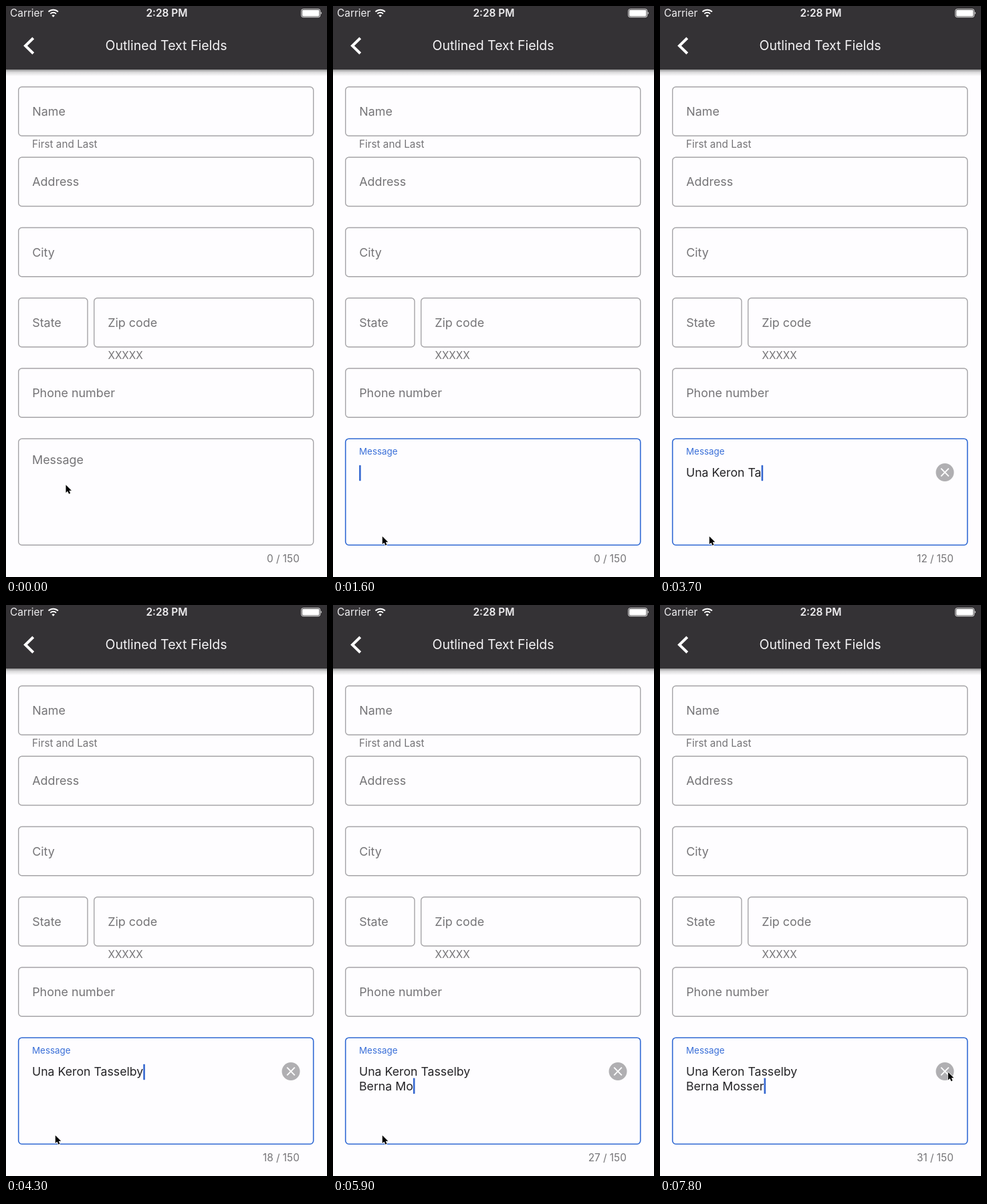
An HTML page for the animation above (8 s loop, 480 by 854 pixels).

```html
<!DOCTYPE html>
<html lang="en">
<head>
<meta charset="utf-8">
<title>Outlined Text Fields</title>
<style>
  html, body { margin: 0; width: 100%; height: 100%; overflow: hidden; background: #fefdff; }
  svg { display: block; width: 100%; height: 100%; }
  text { font: 17.9px Inter, "Liberation Sans", sans-serif; fill: #757477; white-space: pre; }
  .field { fill: none; stroke: #a5a4a7; stroke-width: 1.4; }
  .field.focus { stroke: #3069d3; stroke-width: 1.6; }
  .small { font-size: 15.3px; }
  .status { font-size: 15.4px; fill: #f0eff1; }
  .time { font-weight: 600; text-anchor: middle; }
  .title { font-size: 19.5px; fill: #f5f4f6; text-anchor: middle; }
  .count { text-anchor: end; }
  .typed { font-size: 17.7px; fill: #242326; }
  .blue { fill: #3a6fd8; }
  .line { fill: none; stroke: #fff; }
</style>
</head>
<body>
<svg viewBox="0 0 480 854">
  <defs>
    <linearGradient id="shade" x2="0" y2="1">
      <stop stop-color="#000" stop-opacity=".42"/>
      <stop offset=".4" stop-color="#000" stop-opacity=".14"/>
      <stop offset="1" stop-color="#000" stop-opacity="0"/>
    </linearGradient>
  </defs>
  <rect width="480" height="854" fill="#fefdff"/>

  <rect y="95" width="480" height="10" fill="url(#shade)"/>
  <rect width="480" height="95" fill="#343235"/>
  <text class="status" x="6" y="16.3">Carrier</text>
  <g class="line" stroke-width="2">
    <path d="M63.5 8.6a10.3 10.3 0 0 1 14.4 0M66.4 11.6a6.2 6.2 0 0 1 8.6 0"/>
    <path d="M70.7 16.8l-2.3-2.5a3.4 3.4 0 0 1 4.6 0z" fill="#fff" stroke="none"/>
  </g>
  <text class="status time" x="240.5" y="16.3">2:28 PM</text>
  <rect class="line" x="441.7" y="4.7" width="28" height="12" rx="2.6" stroke-width=".9"/>
  <rect x="443" y="6" width="25.4" height="9.4" rx="1.4" fill="#fff"/>
  <path d="M470.8 8.6q2.2 2 0 4.2z" fill="#fff"/>
  <path class="line" d="M40.8 48L29 59.5 40.8 71" stroke-width="4"/>
  <text class="title" x="239.5" y="66.2">Outlined Text Fields</text>

  <g id="form"></g>
  <text class="small" x="39" y="212.3">First and Last</text>
  <text class="small" x="152.5" y="528">XXXXX</text>

  <rect id="box" class="field" x="18.7" y="647.2" width="441" height="159" rx="5"/>
  <text id="label">Message</text>
  <rect id="mark" y="707" height="24.5" fill="#d0def5"/>
  <text id="line0" class="typed" x="39" y="704.4"></text>
  <text id="line1" class="typed" x="39" y="726.3"></text>
  <g id="chip">
    <path d="M.5 .5H59.5a13.6 13.6 0 0 1 0 27.2H.5z" fill="#fff" stroke="#bcbbbe"/>
    <text class="blue" x="2.6" y="20.6">Moss</text>
    <path d="M54 9.5l9 9m0-9l-9 9" stroke="#b3b2b5" stroke-width="1.4"/>
  </g>
  <rect id="caret" width="2.6" height="23.4" rx=".6" fill="#3567d0"/>
  <g id="clear">
    <circle cx="426" cy="697.5" r="13.5" fill="#b0afb2"/>
    <path class="line" d="M420.2 691.7l11.6 11.6m0-11.6l-11.6 11.6" stroke-width="1.9"/>
  </g>
  <text id="count" class="small count" x="438.8" y="831.8"></text>

  <circle id="ring" cx="90" cy="717.5" r="49.5" fill="none" stroke="#222" stroke-width="2.4"/>
  <path id="pointer" d="M0 0V11.8L2.7 9.3 4.6 13.4 6.7 12.5 4.9 8.4H8.5Z"
        stroke="#fff" stroke-width="1.4" paint-order="stroke" stroke-linejoin="round"/>
</svg>
<script>
const LOOP = 8000, STEP = 100;
const el = id => document.getElementById(id);
const [form, box, label, mark, chip, caret, clear, count, ring, pointer] =
  ["form", "box", "label", "mark", "chip", "caret", "clear", "count", "ring", "pointer"].map(el);
const lines = [el("line0"), el("line1")];

const fields = [
  ["Name", 18.7, 121, 441], ["Address", 18.7, 226.2, 441], ["City", 18.7, 331.5, 441],
  ["State", 18.7, 436.7, 103.3], ["Zip code", 131.7, 436.7, 328], ["Phone number", 18.7, 542, 441]
];
form.innerHTML = fields.map(([name, x, y, w]) =>
  `<rect class="field" x="${x}" y="${y}" width="${w}" height="73.3" rx="5"/>
   <text x="${x + 20.5}" y="${y + 43}">${name}</text>`).join("");

// One time per keystroke, in units of 100 ms
const text = "Una Keron Tasselby\nBerna Mosser";
const keys = [17, 19, 21, 23, 25, 27, 30, 32, 33, 34, 36, 37, 38, 39, 40, 41, 42, 43, 45,
              48, 50, 52, 53, 54, 55, 57, 59, 61, 63, 64, 67];

// Pointer stops: time, x, y
const path = [[700, 89.5, 716.3], [1100, 73.8, 793.3], [6900, 73.8, 793.3],
              [7600, 435, 702], [7800, 430.8, 698.8]];

const show = (node, on) => node.setAttribute("visibility", on ? "visible" : "hidden");
const set = (node, attrs) => { for (const k in attrs) node.setAttribute(k, attrs[k]); };
const ease = p => p * p * (3 - 2 * p);

function pointerAt(t) {
  const i = path.findIndex(p => p[0] > t);
  if (i === 0) return path[0].slice(1);
  if (i < 0) return path[path.length - 1].slice(1);
  const [a, b] = [path[i - 1], path[i]];
  const p = ease((t - a[0]) / (b[0] - a[0]));
  return [a[1] + (b[1] - a[1]) * p, a[2] + (b[2] - a[2]) * p];
}

// 500 ms blink, held solid while keys are pressed
function blink(t) {
  if (t < 500) return 0;
  if (t >= 1700 && t < 6900) return 1;
  const phase = (t - (t < 1700 ? 600 : 6800)) % 500;
  return phase < 0 || phase < 200 ? 1 : phase < 300 ? 0.5 : 0;
}

function draw(t) {
  const focus = t >= 500;
  box.classList.toggle("focus", focus);
  label.classList.toggle("blue", focus);
  const up = t < 500 ? 0 : t < 600 ? 0.5 : 1;
  set(label, { transform: `translate(39 ${685 - 14.2 * up}) scale(${1 - 0.25 * up})` });

  const n = keys.filter(k => k * 100 <= t).length;
  const parts = text.slice(0, n).split("\n");
  lines.forEach((line, i) => line.textContent = parts[i] || "");
  count.textContent = `${n} / 150`;
  show(clear, n > 0);

  const row = parts.length - 1;
  const end = 38.8 + (parts[row] ? lines[row].getComputedTextLength() : 0);
  set(caret, { x: end + 0.3, y: row ? 707.6 : 686.8, opacity: blink(t) });

  const fix = t >= 6500 && t < 6700;
  show(mark, fix);
  show(chip, fix);
  if (fix) {
    const from = 38.8 + lines[1].getSubStringLength(0, 6) - 1.8;
    set(mark, { x: from, width: end - from });
    set(chip, { transform: `translate(${from - 0.5} 732)` });
  }

  show(ring, t >= 100 && t < 500);
  set(pointer, { transform: `translate(${pointerAt(t)})` });
}

const start = performance.now();
let last = -1;
function tick() {
  const t = Math.floor((performance.now() - start) % LOOP / STEP) * STEP;
  if (t !== last) draw(last = t);
  requestAnimationFrame(tick);
}
tick();
</script>
</body>
</html>
```
